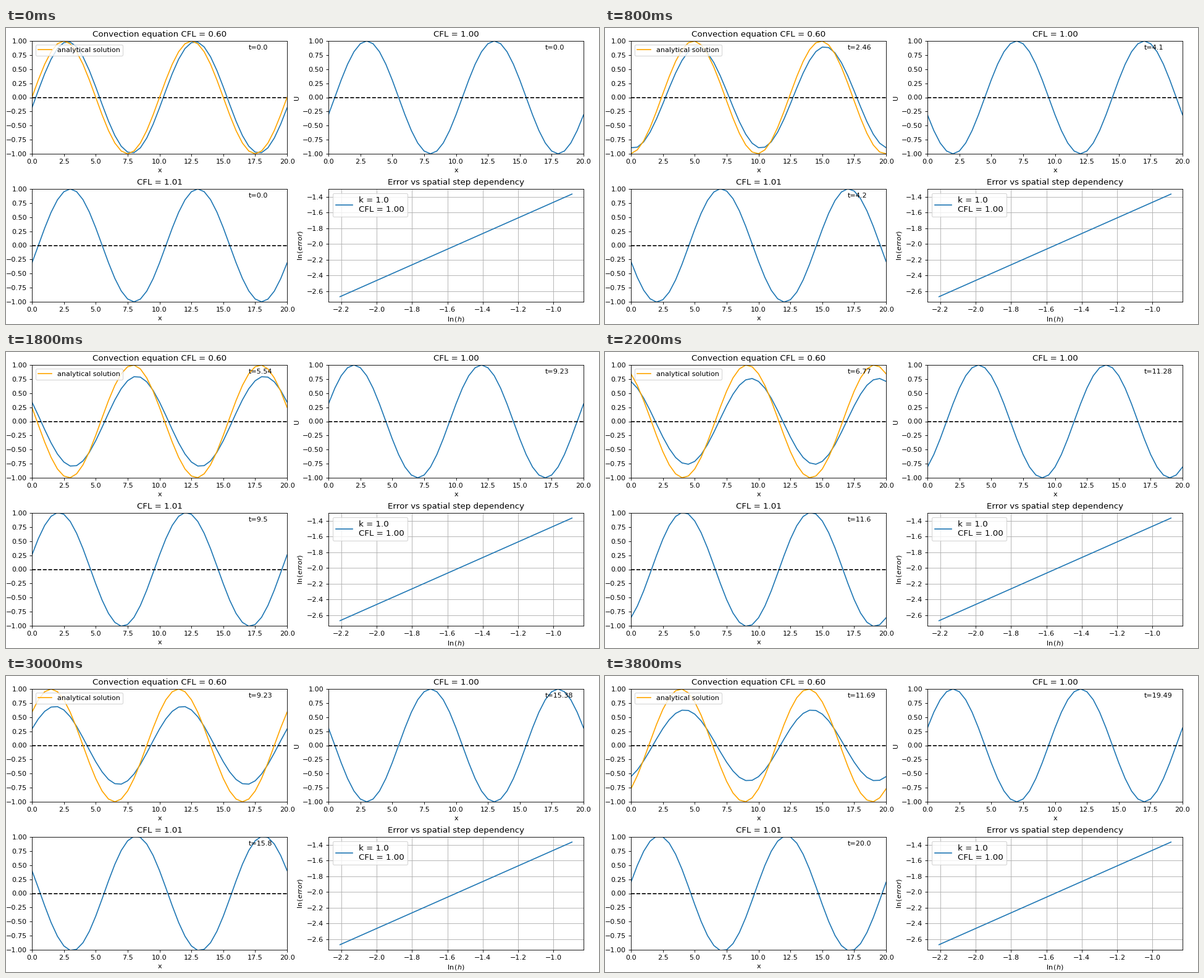
A matplotlib script that plays this animation: 960 by 480 pixels, repeating every 3900 ms.

```python
import matplotlib.pyplot as plt
import numpy as np
from matplotlib.animation import FuncAnimation

WIDTH, HEIGHT, DPI = 960, 480, 80
FRAMES, INTERVAL = 39, 100
STEP, LENGTH, PERIOD = 0.5, 20, 10
WAVE = 2 * np.pi / PERIOD

x = np.linspace(0, LENGTH, 41)
fig = plt.figure(figsize=(WIDTH / DPI, HEIGHT / DPI), dpi=DPI, facecolor="white")


def add_panel(left, bottom, title):
    """Axes of the common size, placed in pixels."""
    ax = fig.add_axes([left / WIDTH, bottom / HEIGHT, 413 / WIDTH, 183 / HEIGHT])
    ax.set_title(title)
    return ax


def upwind(cfl, steps):
    """Sine wave after a number of first-order upwind steps."""
    gain = 1 - cfl + cfl * np.exp(-1j * WAVE * STEP)
    return (gain ** steps * np.exp(1j * WAVE * x)).imag


class WavePanel:
    def __init__(self, left, bottom, title, cfl, end, intervals, digits):
        self.cfl, self.digits = cfl, digits
        self.dt = end / intervals
        self.ax = ax = add_panel(left, bottom, title)
        self.line, = ax.plot(x, upwind(cfl, 1), color="C0")
        ax.hlines(0, 0, LENGTH, colors="black", linestyles="--")
        self.clock = ax.text(17, 0.85, "t=0.0")
        ax.set_xticks(np.arange(0, LENGTH + 1, 2.5))
        ax.set_yticks(np.arange(-4, 5) / 4)
        ax.set_xlim(0, LENGTH)
        ax.set_ylim(-1, 1)
        ax.set_xlabel("x")

    def update(self, n):
        self.line.set_ydata(upwind(self.cfl, n + 1))
        self.clock.set_text(f"t={round(n * self.dt, self.digits)}")


damped = WavePanel(42, 276, "Convection equation CFL = 0.60", 0.6, 12, 39, 2)
exact = WavePanel(522, 276, "CFL = 1.00", 1.0, 20, 39, 2)
growing = WavePanel(42, 36, "CFL = 1.01", 1.01, 20, 38, 1)
panels = [damped, exact, growing]

exact.ax.set_ylabel("U")
analytic, = damped.ax.plot(x, np.sin(WAVE * x), color="orange",
                           label="analytical solution")
damped.ax.legend(loc="upper left")

error_ax = add_panel(522, 36, "Error vs spatial step dependency")
error_ax.plot([-2.207, -0.896], [-2.668, -1.366], label="k = 1.0\nCFL = 1.00")
error_ax.set_xticks(np.arange(-11, -4) / 5)
error_ax.set_yticks(np.arange(-13, -6) / 5)
error_ax.set_xlabel(r"$\ln{(h)}$")
error_ax.set_ylabel(r"$\ln{(error)}$")
error_ax.grid(True)
error_ax.legend(loc="upper left", fontsize=12)


def update(n):
    for panel in panels:
        panel.update(n)
    analytic.set_ydata(np.sin(WAVE * (x - damped.cfl * STEP * n)))
    return [analytic]


anim = FuncAnimation(fig, update, frames=FRAMES, interval=INTERVAL,
                     repeat=True, repeat_delay=0)
plt.show()
```
